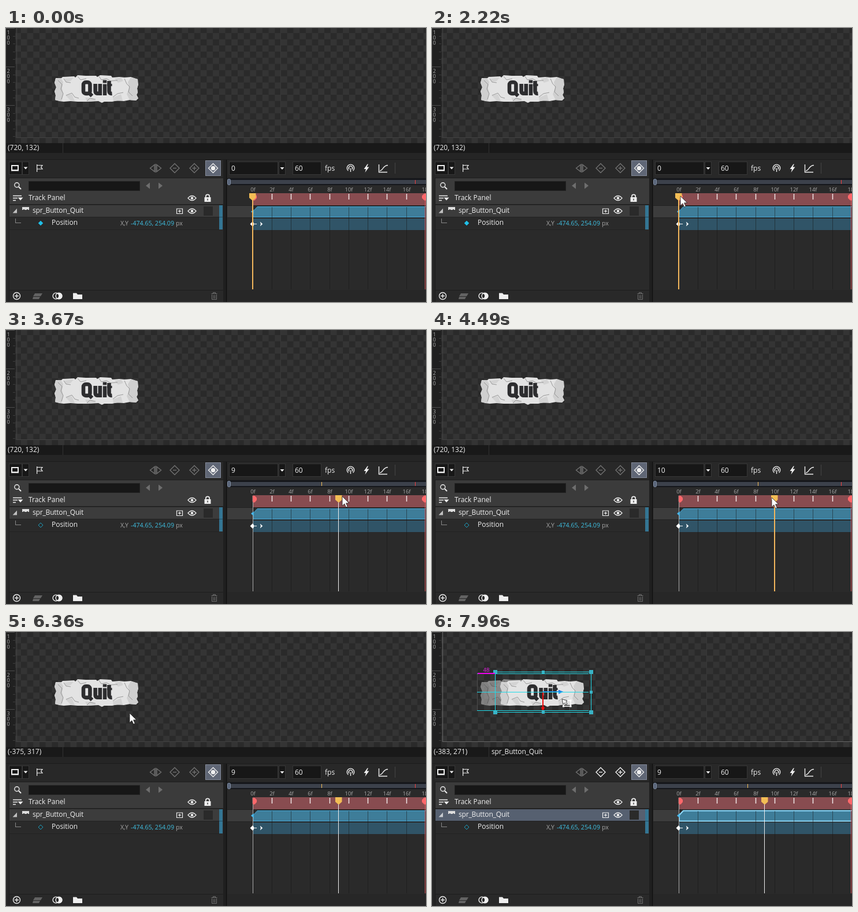
Animation of 727 by 476 pixels, one loop 8000 ms. Source, as an HTML page:

```html
<!DOCTYPE html>
<html lang="en">
<head>
<meta charset="utf-8">
<title>Sequence editor</title>
<style>
  html, body { margin: 0; width: 727px; height: 476px; overflow: hidden; background: #252525; }
  svg { display: block; }
  text { font: 12px "Open Sans", "Noto Sans", sans-serif; fill: #f0f0f0; white-space: pre; }
  .small { font-size: 10.6px; }
  .tick { font-size: 9.5px; fill: #a8a8a8; text-anchor: middle; }
  .rule { font-size: 9px; fill: #aaa; text-anchor: middle; }
  .name { letter-spacing: -.2px; }
  .crisp { shape-rendering: crispEdges; }
  .icon { fill: none; stroke: #eee; stroke-width: 1.4; }
  .dim { stroke: #707070; }
  .solid { fill: #eee; stroke: none; }
  .cyan { fill: none; stroke: #20dcea; }
  .field { fill: #171717; stroke: #373737; }
</style>
</head>
<body>
<svg id="stage" width="727" height="476" viewBox="0 0 727 476">
  <defs>
    <pattern id="checker" width="21.44" height="21.44" patternUnits="userSpaceOnUse" patternTransform="translate(476 -66.2)">
      <rect width="22" height="22" fill="#2a2a2a"/>
      <path d="M0 0h10.72v10.72H0zM10.72 10.72h10.72v10.72H10.72z" fill="#343434"/>
    </pattern>
    <g id="eye" fill="none" stroke="#eee" stroke-width="1.3">
      <path d="M-7 0Q0-8 7 0Q0 8-7 0Z"/><circle r="2.3" fill="#eee" stroke="none"/>
    </g>
    <path id="diamond" d="M0-8L8 0L0 8L-8 0Z"/>
    <g id="stone">
      <path fill="#e3e3e3" d="M86 87L96 87 98 85 118 84 120 86 124 82 138 83 156 83 158 85 163 82 182 83 184 86 196 85 205 86 216 85 228 89 227 95 229 98 227 105 228 112 226 116 229 122 225 126 214 125 204 127 192 126 184 128 170 128 166 130 160 127 140 128 124 128 112 127 100 128 92 127 85 125 86 117 84 110 87 103 84 95Z"/>
      <path fill="#cfcfcf" d="M86 88L95 87 99 94 97 104 99 114 96 127 85 125 86 117 84 110 87 103 84 95ZM228 89L216 86 211 94 213 104 209 115 214 125 225 126 229 122 226 116 228 112 227 105 229 98Z"/>
      <path fill="#d3d3d3" d="M101 88L117 86 112 92 104 94ZM103 117L114 115 119 127 112 126ZM188 88L199 86 203 92 194 95ZM185 121L199 115 202 126 186 127ZM137 121L150 122 156 127 141 128Z"/>
      <path fill="none" stroke="#868686" stroke-width=".8" d="M90 91L97 98 95 106 99 114 96 124M100 88L104 94 112 95M104 117L114 113 119 120 126 122M124 84L129 90 139 88M161 84L165 90 174 88 181 92 193 91M205 88L209 97 214 102 212 111 219 118M185 120L193 114 203 112M140 127L145 122 155 124"/>
      <g fill="none" stroke="#2d2d2f" stroke-width="6.6" role="img" aria-label="Quit">
        <rect x="134" y="94.3" width="11.4" height="19.6" rx="4"/>
        <path d="M142 111L149 118M154.6 97V110Q154.6 114 158.6 113.6Q162.8 113 162.8 110M162.8 97V117M171 97.5V117M171 90.5V95.5M178.5 92V110Q178.5 114.2 183.5 113.8"/>
        <path d="M175 99H183.5" stroke-width="4"/>
      </g>
    </g>
  </defs>

  <!-- viewport -->
  <rect x="16" width="711" height="200" fill="url(#checker)"/>
  <g class="crisp">
    <rect width="16" height="200" fill="#202020"/>
    <path d="M475.5 0V200" stroke="#393939"/>
    <path id="border" d="M18.5 0V190.5H727" fill="none"/>
  </g>
  <g id="ruler"></g>

  <rect id="outline" class="crisp" x="78.5" y="72.5" width="160" height="64" fill="none" stroke="#4d4d4d"/>
  <use id="ghost" href="#stone" opacity=".5"/>
  <g id="moving">
    <use href="#stone"/>
    <g id="gizmo">
      <path d="M158 104H187" stroke="#1677e8" stroke-width="2"/>
      <path d="M185 100.5L193.5 104 185 107.5Z" fill="#1677e8"/>
      <path d="M158 104V133" stroke="#ee0d0d" stroke-width="2"/>
      <path d="M154.7 130.5H161.3L158 138.5Z" fill="#ee0d0d"/>
    </g>
    <g id="selection" class="crisp">
      <rect class="cyan" x="75.5" y="69.5" width="166" height="70"/>
      <path d="M72 66h7v7h-7zM238 66h7v7h-7zM72 136h7v7h-7zM238 136h7v7h-7zM156 67h5v5h-5zM156 137h5v5h-5zM239 102h5v5h-5z" fill="#39b3c6"/>
    </g>
  </g>
  <g id="guides">
    <path id="guideLines" class="cyan crisp"/>
    <path id="offsetLine" class="crisp" stroke="#f000f0" stroke-width="2"/>
    <text id="offset" y="69" style="font-size:9.5px;fill:#e012e0;text-anchor:middle"></text>
  </g>

  <!-- status bar -->
  <g class="crisp">
    <rect y="200" width="727" height="17" fill="#191919"/>
    <rect y="217" width="727" height="259" fill="#252525"/>
    <path d="M98.5 200V217" stroke="#343434"/>
    <path d="M0 228.5H727" stroke="#1c1c1c"/>
  </g>
  <text id="coords" x="3" y="212"></text>
  <text id="hint" class="name" x="103" y="212">spr_Button_Quit</text>

  <!-- track panel -->
  <g class="crisp">
    <rect x="5" y="229" width="371" height="247" fill="#1d1d1d"/>
    <rect x="5" y="229" width="371" height="31" fill="#282828"/>
    <rect x="6" y="261" width="370" height="45" fill="#3b3b3b"/>
    <rect x="39.5" y="266.5" width="192" height="16" fill="#171717" stroke="#222"/>
    <rect x="6" y="307" width="370" height="148" fill="#2a2a2a"/>
    <rect id="row" x="6" y="308" width="363" height="20"/>
    <path d="M6 328.5H369M6 350.5H369" stroke="#222"/>
    <rect x="369" y="308" width="6" height="42" fill="#347593"/>
    <path d="M369 328.5H375" stroke="#254c60"/>
    <rect x="6" y="456" width="370" height="20" fill="#292929"/>
    <rect class="field" x="5.5" y="232.5" width="22" height="22"/>
    <rect class="field" x="28.5" y="232.5" width="11" height="22"/>
    <rect x="345.5" y="230.5" width="26" height="26" fill="#5f6675" stroke="#838a99"/>
    <rect x="342" y="310" width="16" height="16" fill="#2a2a2a"/>
    <path d="M16.5 331V338.5H26" fill="none" stroke="#898989"/>
    <path d="M28 311h12v5h-2v-1h-2v1h-4v-1h-2v1h-2z" fill="#ddd"/>
  </g>
  <g class="icon">
    <path d="M10 239h11v8.5H10zM9.3 247H21.7" stroke-width="2"/>
    <path class="solid" d="M30.5 241.5h7l-3.5 4z"/>
    <path d="M53.6 237V250M54 238.5H63L60.5 241.7 63 245H54" stroke-width="1.2"/>
    <path class="dim" d="M257 237.5L249.5 243.5 257 249.5ZM261 237.5L268.5 243.5 261 249.5ZM259 236V251"/>
    <g class="keyTools"><use href="#diamond" x="292" y="243.5"/><path d="M289 243.5h6"/></g>
    <g class="keyTools"><use href="#diamond" x="326" y="243.5"/><path d="M322.5 243.5h7M326 240v7"/></g>
    <use href="#diamond" x="358.5" y="243.5"/><circle class="solid" cx="358.5" cy="243.5" r="3.8"/>
    <circle cx="18.8" cy="272.8" r="4"/><path d="M22 276L26 280" stroke-width="2"/>
    <path fill="#6e6e6e" stroke="none" d="M249 268.5V279.5L242 274ZM264 268.5V279.5L271 274Z"/>
    <path d="M12 291.5H27M12 295.5H20M12 299.5H17" stroke-width="1.7"/>
    <path class="solid" d="M20.5 294.5h9l-4.5 5z"/>
    <use href="#eye" x="322" y="295.5"/><use href="#eye" x="322" y="318"/>
    <path class="solid" d="M343.5 294h11v8h-11z"/>
    <path d="M345.8 294V292.5a3.2 3.2 0 0 1 6.4 0V294" stroke-width="1.7"/>
    <path d="M349 296.5V299.5" stroke="#393939"/>
    <path class="solid" d="M19 313.5V321.5H11.5Z" opacity=".75"/>
    <path d="M295.5 314h10v8.5h-10zM298 318.2h5M300.5 315.7v5" stroke-width="1.2"/>
    <circle cx="18.5" cy="465.5" r="6"/><path d="M15 465.5h7M18.5 462v7"/>
    <path fill="#636363" stroke="none" d="M50 461h13l-3 5H47zM47 467h12l-2 4H46z"/>
    <circle cx="86.5" cy="465.5" r="5.4"/><circle cx="91.5" cy="465.5" r="5.4"/>
    <path class="solid" d="M89 460.4a6 6 0 0 1 0 10.2a5.8 5.8 0 0 0 3 .4a5.5 5.5 0 0 0 0-11z"/>
    <path class="solid" d="M116 460.5h6l2 2.5h8v8h-16z"/>
    <path class="dim" d="M355.5 461.5h10M358.5 461V459.5h4V461M356.5 463v8.5h8V463M359.3 464v6M361.7 464v6" stroke-width="1"/>
  </g>
  <text x="39" y="299">Track Panel</text>
  <text class="name" x="46" y="321">spr_Button_Quit</text>
  <text x="79" y="342">Position</text>
  <text class="small" x="198" y="343" style="fill:#a5a5a5">X,Y</text>
  <text class="small" x="216" y="343" style="fill:#3fc0e2">-474.65, 254.09</text>
  <text class="small" x="294" y="343" style="fill:#a5a5a5">px</text>
  <path id="key" d="M60 335L64 339L60 343L56 339Z" stroke="#1b9fc0"/>

  <!-- timeline -->
  <g class="crisp">
    <rect x="376" y="229" width="7" height="247" fill="#1f1f1f"/>
    <path d="M381.5 229V476" stroke="#101010"/>
    <rect x="383" y="229" width="344" height="31" fill="#282828"/>
    <rect class="field" x="386.5" y="232.5" width="84" height="22"/>
    <rect class="field" x="472.5" y="232.5" width="11" height="22"/>
    <rect class="field" x="496.5" y="232.5" width="49" height="22"/>
    <path d="M673.5 234V253" stroke="#444"/>
    <rect x="383" y="261" width="344" height="12" fill="#15171b"/>
    <rect x="389" y="264" width="338" height="7" fill="#3c414b"/>
    <rect x="383" y="273" width="344" height="182" fill="#2a2a2a"/>
    <rect x="383" y="455" width="344" height="21" fill="#272727"/>
    <rect x="427" y="287" width="300" height="21" fill="#884c50"/>
    <rect x="383" y="309" width="44" height="20" fill="#3c3c3c"/>
    <path d="M708.5 264V271" stroke="#f03d3d"/>
    <path d="M383 308.5H727M383 329.5H727" stroke="#222"/>
  </g>
  <rect x="383.5" y="262.5" width="5" height="10" rx="2" fill="#596579" stroke="#8390a5"/>
  <path id="clip" fill="#3e7d99" d="M428 328.5V318L435 310.5H728V328.5Z"/>
  <rect class="crisp" x="428" y="331" width="299" height="20" fill="#305467"/>
  <g id="frames"></g>
  <path class="crisp" d="M725.5 299V454" stroke="#d9565a"/>
  <path fill="#ff686b" d="M427 288h3.5l3.5 3.5v4l-3.5 4H427zM727 287.5h-3l-4 4v4l4 4h3z"/>
  <path id="start" class="crisp" d="M427.5 299V454" stroke="#aaa"/>
  <path fill="#49b9ee" d="M428.5 315V323L424 319Z"/>
  <path fill="#fff" d="M422.5 340.5L427 336 429 338.5V343L427 345ZM439.8 336.5L444.3 340.5 439.8 344.5 441 340.5Z"/>
  <path class="crisp" d="M429 340.5H434" stroke="#fff"/>
  <g class="icon">
    <path class="solid" d="M474.5 242h7l-3.5 4z"/>
    <path d="M592.4 248a6.2 6.2 0 1 1 8.2 0M594 245.5a3.3 3.3 0 1 1 5 0M596.5 243.5V250"/>
    <path class="solid" d="M625.5 236.5L619.5 245H623L621.5 251 628.5 241.5H624.5L627 236.5Z"/>
    <path d="M645.5 237V250.5H660M647 248C653 248 652 238.5 661 238.5"/>
  </g>
  <text id="frameNo" x="390" y="248"></text>
  <text x="500" y="248">60</text>
  <text x="552" y="248">fps</text>
  <path id="overview" class="crisp" d="M381.5 264V271"/>
  <g id="playhead">
    <path id="headLine" class="crisp"/>
    <path fill="#f3bd55" d="M421 287H432.5V295L426.8 300 421 295Z"/>
  </g>

  <g id="cursor">
    <path id="arrow" d="M0 0V16.5L3.9 12.8 6.6 19 9.2 17.9 6.6 11.8H11.8Z" fill="#fff" stroke="#222" stroke-width=".8"/>
    <g id="dragArrow" transform="translate(5 1.5)" stroke="#111" stroke-width=".8">
      <path d="M0 0L9 3 6.5 5 9 8 7 9.5 4.5 6.5 2 9Z" fill="#fff"/>
      <path d="M9 2.5H15V12.5H2.5V9.5" fill="none" stroke="#fff" stroke-width="1.6"/>
      <path d="M13.5 1h3v3h-3zM13.5 11h3v3h-3zM1 11h3v3H1z" fill="#fff" stroke="none"/>
    </g>
  </g>
</svg>
<script>
const $ = id => document.getElementById(id);
const LOOP = 8000, FRAME = 16.625, UNITS = 1.4925;
const SELECT = 7590, HOVER = 6530, LEAVE = 5880, GRAB_X = 184.6;

// Rows: first step, last step, step count, cursor x, cursor y at the end.
const START = [692, 415];
const moves = [
  [590, 1300, 9, 427, 288], [1390, 1570, 3, 429, 292],
  [2310, 2940, 8, 525, 289], [3030, 3120, 2, 525, 288.5],
  [3310, 3940, 8, 607, 289], [4220, 4490, 4, 587, 291],
  [5050, 5230, 3, 575, 291], [5880, 6060, 3, 470, 320],
  [6140, 6270, 3, 225, 146], [6360, 6360, 1, 213, 141],
  [6440, 6630, 3, 186, 110], [6720, 6900, 3, 178, 101],
  [6990, 7080, 2, 183, 114], [7260, 7320, 2, GRAB_X, 116.7],
  [7780, 7960, 3, 219.4, 115.3]
];

function cursorAt(t) {
  let [x, y] = START;
  for (const [from, to, steps, endX, endY] of moves) {
    if (t < from) break;
    const gap = (to - from) / (steps - 1) || 1;
    const step = Math.min(steps - 1, Math.floor((t - from) / gap + .01));
    let p = (step + 1) / steps;
    if (steps > 7) p = p * p * (3 - 2 * p);
    x += (endX - x) * p;
    y += (endY - y) * p;
  }
  return { x, y };
}

function buildScales() {
  let ruler = '', frames = '';
  for (let i = 0; i < 3; i++) {
    const y = .8 + i * 67;
    ruler += `<path class="crisp" d="M0 ${y}H15" stroke="#4c4c4c"/>`;
    for (let k = 1; k < 5; k++) ruler += `<path class="crisp" d="M12 ${y + k * 13.4}H16" stroke="#3c3c3c"/>`;
    [i + 1, 0, 0].forEach((d, k) => ruler += `<text class="rule" x="4" y="${y + 10 + k * 9}">${d}</text>`);
  }
  for (let f = 0; f <= 18; f += 2) {
    const x = Math.floor(427 + f * FRAME) + .5;
    frames += `<text class="tick" x="${x}" y="284">${f}f</text>
      <path class="crisp" d="M${x} 311V454" stroke="#151515" opacity=".5"/>
      <path d="M${x} 288V298" stroke="#f2e8e8" stroke-width="1.5"/>`;
  }
  $('ruler').innerHTML = ruler;
  $('frames').innerHTML = frames;
}

const show = (id, on) => $(id).style.display = on ? '' : 'none';
const set = (id, name, value) => $(id).setAttribute(name, value);
const move = (id, x, y = 0) => set(id, 'transform', `translate(${x} ${y})`);

function drawTimeline(t, x) {
  const frame = t < 2220 ? 0 : t >= LEAVE ? 9 : Math.round((x - 427) / FRAME);
  const gold = frame % 10 === 0;
  $('frameNo').textContent = frame;
  move('playhead', Math.round(frame * FRAME - .3));
  set('headLine', 'd', `M${gold ? 427 : 426.5} 299V454`);
  set('headLine', 'stroke', gold ? '#f3b65c' : '#eee');
  set('headLine', 'stroke-width', gold ? 2 : 1);
  move('overview', Math.round(frame * 18.3));
  set('overview', 'stroke', frame > 6 ? '#f3bd55' : '#eee');
  show('overview', frame);
  show('start', frame);
  set('key', 'fill', frame ? 'none' : '#22bfe6');
}

function drawViewport(t, x) {
  const selected = t >= SELECT;
  const dx = selected ? Math.max(0, Math.round(x - GRAB_X - .4)) : 0;
  show('outline', t >= HOVER);
  show('gizmo', t >= HOVER);
  show('selection', selected);
  show('hint', selected);
  show('ghost', dx);
  show('guides', dx);
  move('moving', dx);
  set('guideLines', 'd', [72.5, 104.5, 136.5].map(y => `M78 ${y}H${237 + dx}`).join(''));
  set('offsetLine', 'd', `M79 72H${75 + dx}`);
  set('offset', 'x', 77 + dx / 2);
  $('offset').textContent = Math.round(dx * 1.41);
  set('border', 'stroke', dx ? '#666' : '#424242');
  set('row', 'fill', selected ? '#566070' : '#3c3c3c');
  set('clip', 'stroke', selected ? '#8edcff' : '#46a9da');
  set('clip', 'stroke-width', selected ? 2 : 1);
  document.querySelectorAll('.keyTools').forEach(el => el.style.stroke = selected ? '#eee' : '#707070');
}

function draw(t) {
  const { x, y } = cursorAt(t);
  drawTimeline(t, x);
  drawViewport(t, x);
  // The readout trails the pointer until it settles on the button.
  const mouse = cursorAt(t < 6700 ? t - 80 : t);
  const world = t > LEAVE && mouse.y < 200
    ? [-474.65 + (mouse.x - 158) * UNITS, 254.09 + (mouse.y - 104) * UNITS].map(Math.round)
    : [720, 132];
  $('coords').textContent = `(${world.join(', ')})`;
  show('cursor', t >= 500);
  show('arrow', t < SELECT);
  show('dragArrow', t >= SELECT);
  move('cursor', Math.round(x + 1), Math.round(y));
}

buildScales();
const begin = performance.now();
function tick() {
  draw((performance.now() - begin) % LOOP);
  requestAnimationFrame(tick);
}
tick();
</script>
</body>
</html>
```
